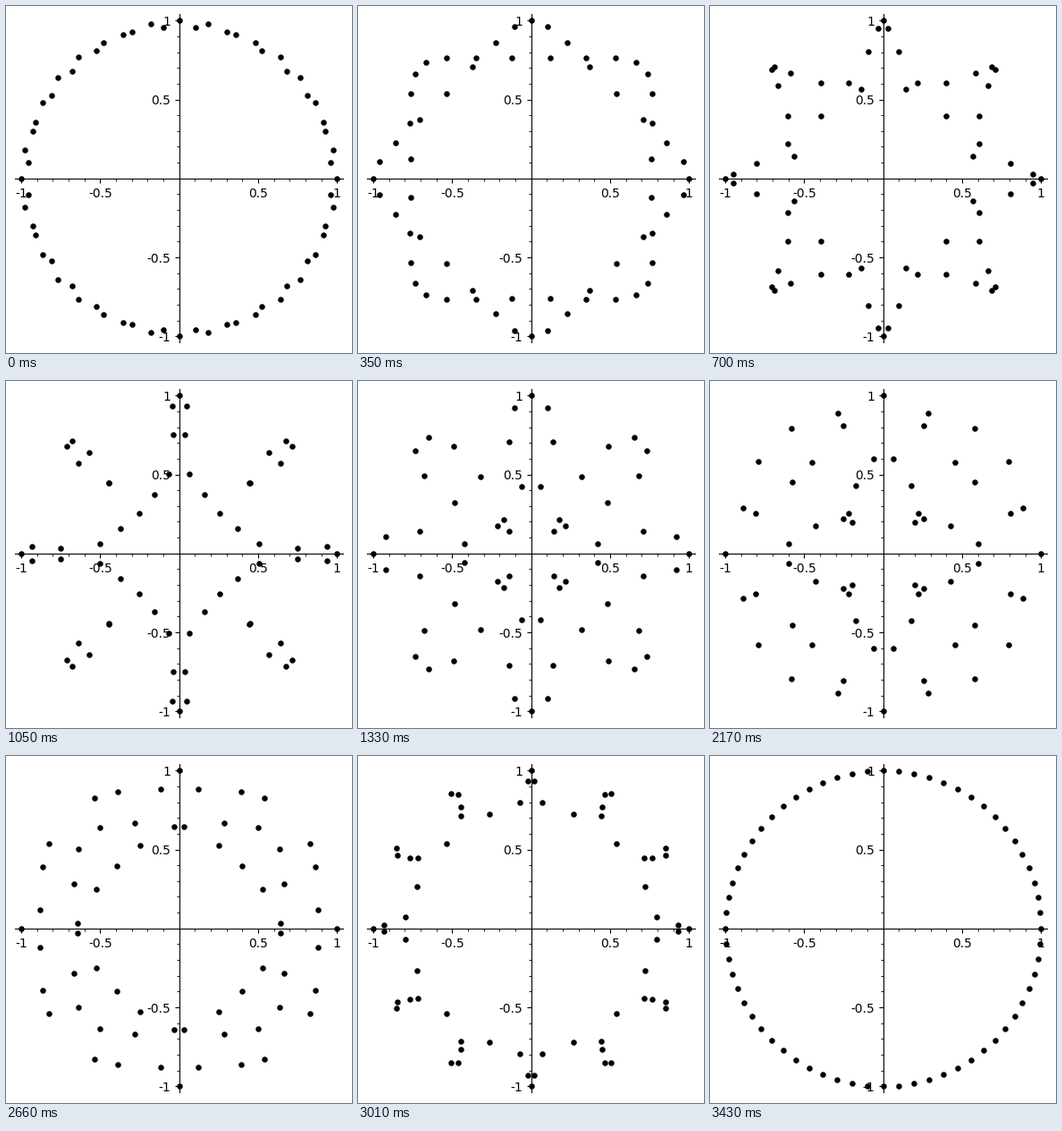
Recreate the animation shown at these times as a matplotlib script. Size 387x388 px, loop 3.5 s.

```python
import matplotlib.pyplot as plt
import numpy as np
from matplotlib.animation import FuncAnimation
from matplotlib.ticker import FixedLocator, FuncFormatter

WIDTH, HEIGHT, DPI = 387, 388, 100
CENTER_X, CENTER_Y = 193.745, 192.8   # origin, in pixels from the top left
UNIT = 176.59                         # pixels per axis unit
LIMIT = 1.04
FRAMES, INTERVAL = 50, 70
COUNT, POWER = 64, 29

plt.rcParams["font.family"] = "DejaVu Sans"
fig = plt.figure(figsize=(WIDTH / DPI, HEIGHT / DPI), dpi=DPI, facecolor="white")

half = LIMIT * UNIT
ax = fig.add_axes([
    (CENTER_X - half) / WIDTH,
    1 - (CENTER_Y + half) / HEIGHT,
    2 * half / WIDTH,
    2 * half / HEIGHT,
])
ax.set_xlim(-LIMIT, LIMIT)
ax.set_ylim(-LIMIT, LIMIT)

for side in ("top", "right"):
    ax.spines[side].set_visible(False)
for side in ("left", "bottom"):
    ax.spines[side].set_position("zero")

major = [-1, -0.5, 0.5, 1]
minor = [i / 10 for i in range(-10, 11) if i % 5]
for axis in (ax.xaxis, ax.yaxis):
    axis.set_major_locator(FixedLocator(major))
    axis.set_minor_locator(FixedLocator(minor))
    axis.set_major_formatter(FuncFormatter(lambda value, _: f"{value:g}"))

# Each dot slides in a straight line from a root of unity to its 29th power.
index = np.arange(COUNT)
start = np.exp(2j * np.pi * index / COUNT)
end = np.exp(2j * np.pi * (POWER * index % COUNT) / COUNT)

dots = ax.scatter(start.real, start.imag, s=10, c="black",
                  edgecolors="face", linewidths=1.5, zorder=5)


def update(frame):
    t = (frame + 1) / FRAMES
    z = (1 - t) * start + t * end
    dots.set_offsets(np.column_stack([z.real, z.imag]))
    return (dots,)


anim = FuncAnimation(fig, update, frames=FRAMES, interval=INTERVAL,
                     repeat=True, repeat_delay=0)
plt.show()
```
